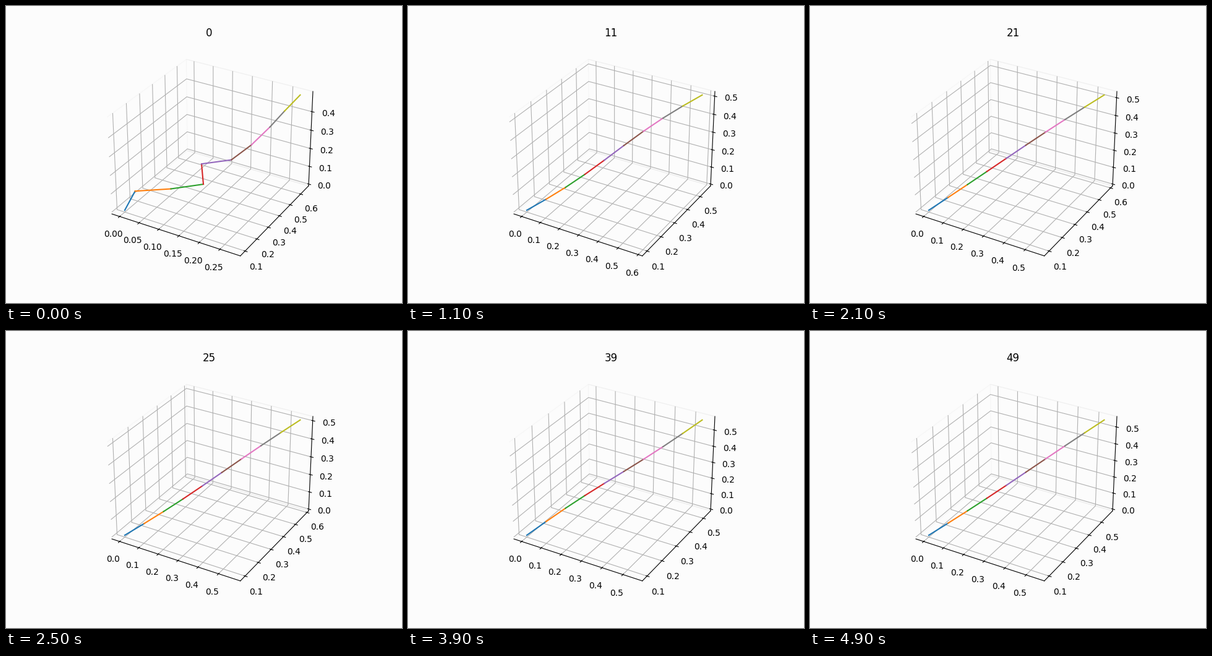
A matplotlib script for the animation above (5000 ms loop, 640 by 480 pixels).

```python
import numpy as np
import matplotlib.pyplot as plt
from matplotlib.animation import FuncAnimation
from matplotlib.ticker import MaxNLocator

FRAMES = 50
SETTLE = 11      # steps until the folded chain is stretched
LINKS = 9
LENGTH = 0.9     # end-to-end length of the stretched chain
Y_START = 0.1
PAPER = "#fcfcfc"

# Joints of the folded chain: position along the diagonal, lift above it.
FOLD = np.array([
    (0, 0), (0.062, 0.134), (0.264, -0.098), (0.45, -0.283), (0.44, -0.045),
    (0.611, -0.216), (0.726, -0.196), (0.83, -0.133), (0.913, -0.063), (1, 0),
]).T

# Step: extent in x, extent in y, bow and wave of the stretched chain.
POSES = {
    0: (0.278, 0.539, 0, 0),
    3: (0.42, 0.61, 0, 0),
    11: (0.578, 0.453, 0, -0.029),
    18: (0.459, 0.521, 0.027, 0),
    22: (0.58, 0.47, 0.007, -0.007),
    25: (0.564, 0.479, -0.015, -0.01),
    32: (0.568, 0.442, 0.003, -0.012),
    39: (0.551, 0.425, 0.005, 0.014),
    49: (0.545, 0.459, -0.01, -0.005),
}


def chain(step):
    """Coordinates of the ten joints at one step."""
    dx, dy, bow, wave = [np.interp(step, list(POSES), values)
                         for values in zip(*POSES.values())]
    reach = LENGTH - 0.116 * np.exp(-step / 3)
    dz = np.sqrt(reach**2 - dx**2 - dy**2)

    even = np.linspace(0, 1, LINKS + 1)
    bend = bow * np.sin(np.pi * even) + wave * np.sin(2 * np.pi * even)
    folded = max(0, 1 - step / SETTLE) ** 2
    along, lift = folded * FOLD + (1 - folded) * np.array([even, bend])
    return dx * along, Y_START + dy * along, dz * (along + lift)


def fit_axis(axis, set_limits, values, margin):
    low, high = values.min(), values.max()
    pad = margin * (high - low)
    low, high = low - pad, high + pad
    set_limits(low, high, view_margin=1 / 48)
    ticks = locator.tick_values(low, high)
    axis.set_ticks([t for t in ticks if low - 1e-9 <= t <= high + 1e-9])


fig = plt.figure(figsize=(6.4, 4.8), dpi=100, facecolor=PAPER)
ax = fig.add_subplot(projection="3d", facecolor=PAPER)
for axis in (ax.xaxis, ax.yaxis, ax.zaxis):
    axis.pane.fill = False
locator = MaxNLocator(nbins=9, steps=[1, 2, 2.5, 5, 10])
segments = [ax.plot([0, 1], [0, 1], [0, 1])[0] for _ in range(LINKS)]
title = ax.set_title("0")


def draw(step):
    x, y, z = chain(step)
    for i, segment in enumerate(segments):
        segment.set_data_3d(x[i:i + 2], y[i:i + 2], z[i:i + 2])
    fit_axis(ax.xaxis, ax.set_xlim, x, 0.05)
    fit_axis(ax.yaxis, ax.set_ylim, y, 0.05)
    fit_axis(ax.zaxis, ax.set_zlim, z, 0)
    title.set_text(str(step))
    return segments


animation = FuncAnimation(fig, draw, frames=FRAMES, interval=100, repeat=True, repeat_delay=0)
plt.show()
```
